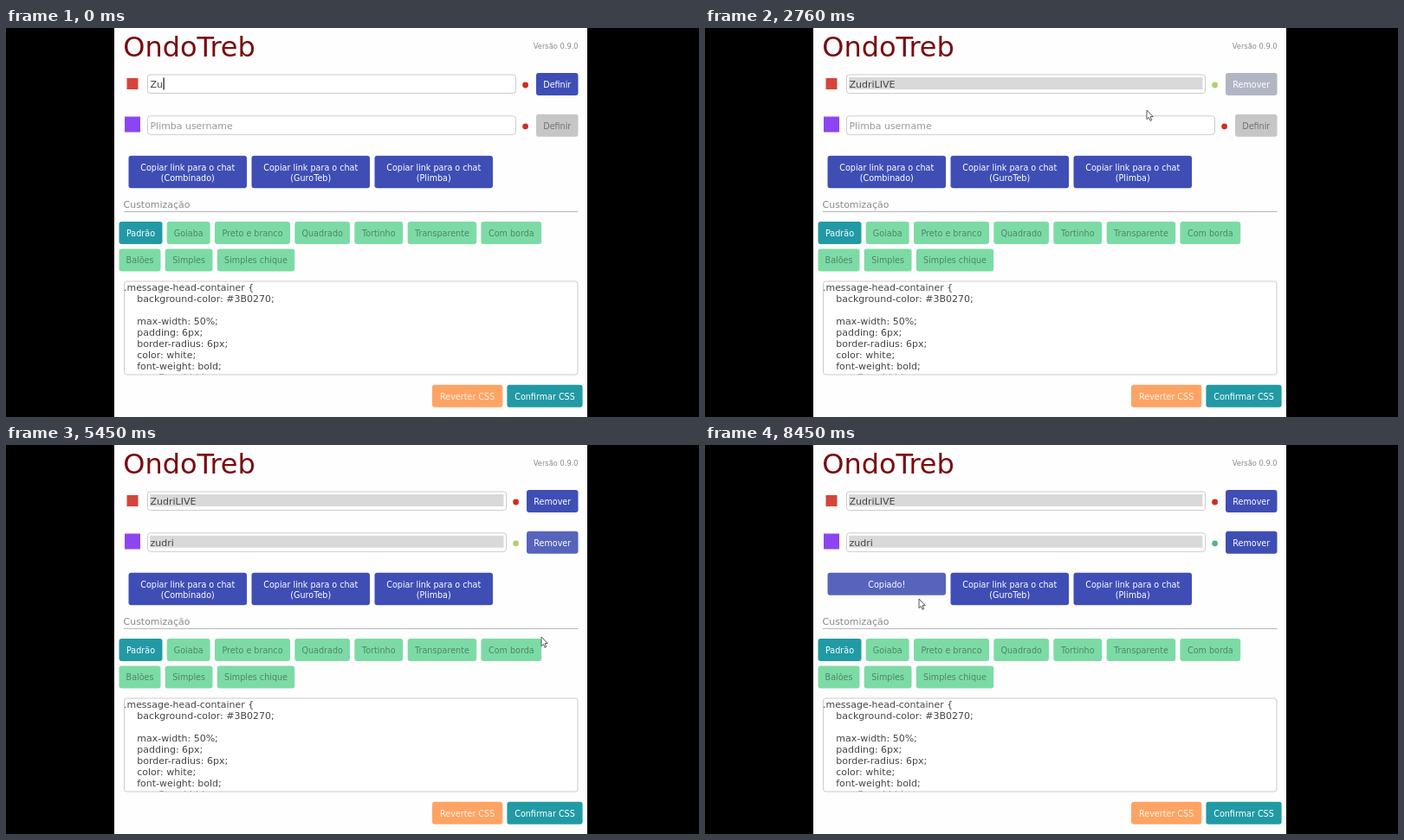
An HTML page with a canvas for the animation above (8510 ms loop, 800 px wide and 450 px high).

```html
<!DOCTYPE html>
<html lang="pt">
<head>
<meta charset="utf-8">
<title>OndoTreb</title>
<style>
html, body { margin: 0; width: 100%; height: 100%; overflow: hidden; background: #000; }
canvas { display: block; width: 800px; height: 450px; }
</style>
</head>
<body>
<canvas id="stage"></canvas>
<script>
const LOOP = 8510;
const FONT = '"DejaVu Sans", Verdana, sans-serif';
const BLUE = [63, 78, 181], FOCUS = [86, 100, 188], GREY = [198, 198, 198];
const YELLOW = [214, 214, 84], LIME = [178, 208, 110], GREEN = [84, 180, 132], RED = [208, 44, 32];
const TEAL = '#219aa5', MINT = '#7cdba5', MINT_TEXT = '#4f8468';
const CHANNEL = 'ZudriLIVE', LOGIN = 'zudri';

// Moments of the story, in ms
const SET_1 = 2470, OFFLINE_1 = 3300, FOCUS_2 = 3190;
const TYPE_2 = 3620, SET_2 = 4980, COPY = 7640;

// Pointer stops: time, x, y
const PATH = [
  [1600, 677, 324], [2060, 642, 138], [2130, 642, 138], [2330, 635, 68], [2500, 635, 68],
  [2760, 510, 95], [3080, 474, 112], [4400, 474, 112], [4780, 635, 115], [5040, 635, 115],
  [5420, 618, 222], [6160, 618, 222], [6960, 314, 207], [7030, 314, 207],
  [7420, 222, 164], [7820, 222, 164], [8300, 247, 178], [LOOP, 247, 178]
];

const canvas = document.getElementById('stage');
const ctx = canvas.getContext('2d');
const dpr = window.devicePixelRatio || 1;
canvas.width = 800 * dpr;
canvas.height = 450 * dpr;

const clamp = v => Math.max(0, Math.min(1, v));
const ease = v => v * v * (3 - 2 * v);
const rgb = c => `rgb(${c.map(Math.round).join()})`;
const mix = (a, b, k) => a.map((v, i) => v + (b[i] - v) * clamp(k));

function box(x, y, w, h, fill, r = 3) {
  ctx.beginPath();
  ctx.roundRect(x, y, w, h, r);
  ctx.fillStyle = fill;
  ctx.fill();
}

function frame(x, y, w, h) {
  ctx.beginPath();
  ctx.roundRect(x + 0.5, y + 0.5, w - 1, h - 1, 3);
  ctx.fillStyle = '#fff';
  ctx.fill();
  ctx.strokeStyle = '#cbcbcb';
  ctx.lineWidth = 1;
  ctx.stroke();
}

function text(str, x, y, size, color, align = 'left') {
  ctx.font = `${size}px ${FONT}`;
  ctx.textAlign = align;
  ctx.fillStyle = color;
  ctx.fillText(str, x, y);
}

function button(x, y, w, h, fill, color, ...lines) {
  box(x, y, w, h, fill);
  lines.forEach((s, i) => text(s, x + w / 2, y + 16.8 + i * 12, 9.6, color, 'center'));
}

function dot(x, y, color) {
  ctx.beginPath();
  ctx.arc(x, y, 3.4, 0, 7);
  ctx.fillStyle = rgb(color);
  ctx.fill();
}

function pointerAt(t) {
  if (t < PATH[0][0]) return null;
  const i = PATH.findIndex(p => p[0] > t);
  const [t0, x0, y0] = PATH[i - 1], [t1, x1, y1] = PATH[i];
  const k = ease((t - t0) / (t1 - t0));
  return { x: x0 + (x1 - x0) * k, y: y0 + (y1 - y0) * k };
}

const over = (p, x, y, w, h) => !!p && p.x >= x && p.x < x + w && p.y >= y && p.y < y + h;

// One channel row: input, status dot and action button
function row(y, s, p) {
  const narrow = s.set ? 11 : 0;
  frame(163, y + 1.5, 426 - narrow, 22.5);
  if (s.set) box(166, y + 5, 408.5, 14, '#d9d9d9', 0);
  const base = y + 16.9;
  if (s.value) text(s.value, 166.5, base, 11, '#444');
  else text(s.hint, 166.5, base, 10.95, '#999');
  if (s.caret) {
    ctx.font = `11px ${FONT}`;
    box(167 + ctx.measureText(s.value).width, y + 5.5, 1.2, 14, '#111', 0);
  }
  dot(599.6 - narrow, y + 14, s.dot);

  const x = 612 - narrow, w = 48.5 + narrow;
  const on = s.set || s.value;
  const hover = over(p, x, y, w, 26);
  const active = s.focus || hover ? FOCUS : BLUE;
  const fill = on ? mix(GREY, active, s.ready) : GREY;
  button(x, y, w, 26, rgb(fill), on ? '#fff' : '#717171', s.set ? 'Remover' : 'Definir');
}

function copyButtons(t, p) {
  const copied = t >= COPY;
  ['Combinado', 'GuroTeb', 'Plimba'].forEach((name, i) => {
    const x = 141.5 + i * 142;
    const done = copied && i === 0;
    const h = done ? 26 : 37.5;
    const fill = rgb(done || over(p, x, 148, 136.5, h) ? FOCUS : BLUE);
    const lines = done ? ['Copiado!'] : ['Copiar link para o chat', `(${name})`];
    button(x, 147.7, 136.5, h, fill, '#fff', ...lines);
  });
}

function themes() {
  [
    ['Padrão', 130.5, 50], ['Goiaba', 185.7, 50], ['Preto e branco', 241, 87],
    ['Quadrado', 333.3, 63.7], ['Tortinho', 402.3, 55.9], ['Transparente', 463.7, 79.5],
    ['Com borda', 548.4, 69.8]
  ].forEach(([s, x, w], i) =>
    button(x, 224, w, 26, i ? MINT : TEAL, i ? MINT_TEXT : '#fff', s));
  [['Balões', 130.5, 48], ['Simples', 183.7, 54.8], ['Simples chique', 243.8, 89.4]]
    .forEach(([s, x, w]) => button(x, 255.5, w, 26, MINT, MINT_TEXT, s));
}

function editor() {
  frame(136, 292.5, 524.5, 109);
  ctx.save();
  ctx.beginPath();
  ctx.rect(136, 293, 524, 107.6);
  ctx.clip();
  text('.message-head-container {', 136, 304, 10.95, '#444');
  ['background-color: #3B0270;', '', 'max-width: 50%;', 'padding: 6px;', 'border-radius: 6px;',
    'color: white;', 'font-weight: bold;', 'overflow: hidden;']
    .forEach((s, i) => text(s, 151.2, 317 + i * 13, 11, '#444'));
  ctx.restore();
}

function shape(points, x, y) {
  ctx.beginPath();
  points.forEach(([a, b]) => ctx.lineTo(x + a, y + b));
  ctx.closePath();
  ctx.fillStyle = '#fff';
  ctx.fill();
  ctx.strokeStyle = '#444';
  ctx.lineWidth = 0.9;
  ctx.lineJoin = 'round';
  ctx.stroke();
}

const ARROW = [[0, 0], [0, 10.6], [2.4, 8.4], [4, 12.3], [5.7, 11.5], [4.1, 7.7], [7.2, 7.5]];
const HAND = [[-1, 0], [0.8, 0], [0.8, 4.2], [6, 5.4], [6, 9], [4.8, 13], [-1.4, 13],
  [-4.4, 8.4], [-3.4, 7.4], [-1, 9]];

function pointer(p, t) {
  if (!p) return;
  const { x, y } = p;
  const beam = t < SET_2 && over(p, 163, 101, 426, 23);
  const hand = over(p, 612, 52, 48, 26) && t < SET_1 ||
    over(p, 601, 100, 59, 26) && t > TYPE_2 ||
    over(p, 141, 148, 137, t < COPY ? 37 : 26) && t > 7000;
  if (beam) {
    ctx.strokeStyle = '#666';
    ctx.lineWidth = 1;
    ctx.beginPath();
    for (const s of [-1, 1]) {
      ctx.moveTo(x - 2.5, y + 5.5 * s);
      ctx.lineTo(x + 2.5, y + 5.5 * s);
    }
    ctx.moveTo(x, y - 5.5);
    ctx.lineTo(x, y + 5.5);
    ctx.stroke();
  } else shape(hand ? HAND : ARROW, x, y);
}

function draw(t) {
  const p = pointerAt(t);
  ctx.setTransform(dpr, 0, 0, dpr, 0, 0);
  ctx.fillStyle = '#000';
  ctx.fillRect(0, 0, 800, 450);
  ctx.save();
  ctx.beginPath();
  ctx.rect(125, 0, 546, 450);
  ctx.clip();
  ctx.fillStyle = '#fefefe';
  ctx.fillRect(125, 0, 546, 450);

  text('OndoTreb', 135.2, 33.3, 32, '#7a0c10');
  text('Versão 0.9.0', 660.6, 23.8, 8.3, '#8a8a8a', 'right');
  box(139.5, 58, 13, 13, '#d5453a', 0);
  box(137, 102.5, 18, 18, '#8d45f2', 0);

  // First field: two letters are already there when the loop starts
  const n1 = Math.min(CHANNEL.length, 2 + Math.floor((t + 30) / 175));
  const set1 = t >= SET_1;
  row(52, {
    value: CHANNEL.slice(0, n1),
    set: set1,
    caret: !set1 && (t < 1820 || t > 2350),
    dot: !set1 || t >= OFFLINE_1 ? RED : mix(YELLOW, LIME, (t - SET_1) / 300),
    focus: set1 && t < FOCUS_2,
    ready: set1 ? (t - 2715) / 260 : 1
  }, p);

  const n2 = t < TYPE_2 ? 0 : Math.min(LOGIN.length, 1 + Math.floor((t - TYPE_2) / 125));
  const set2 = t >= SET_2;
  const blink = (t - FOCUS_2) % 1060 < 530;
  row(99.8, {
    value: LOGIN.slice(0, n2),
    hint: 'Plimba username',
    set: set2,
    caret: t >= FOCUS_2 && !set2 && (blink || n2 > 0 && t < 4650),
    dot: !set2 ? RED : mix(mix(YELLOW, LIME, (t - SET_2) / 400), GREEN, (t - 5480) / 250),
    focus: set2 && t < COPY,
    ready: set2 ? (t - 5130) / 260 : (t - TYPE_2) / 200
  }, p);

  copyButtons(t, p);
  text('Customização', 135.6, 207.5, 10.95, '#888');
  box(136, 212, 524.5, 1, '#b8b8b8', 0);
  themes();
  editor();
  button(492, 412.7, 81.3, 26, '#fda465', '#fff3e6', 'Reverter CSS');
  button(578.4, 412.7, 87.2, 26, TEAL, '#fff', 'Confirmar CSS');
  pointer(p, t);
  ctx.restore();
}

const start = performance.now();
function tick() {
  draw((performance.now() - start) % LOOP);
  requestAnimationFrame(tick);
}
tick();
</script>
</body>
</html>
```
